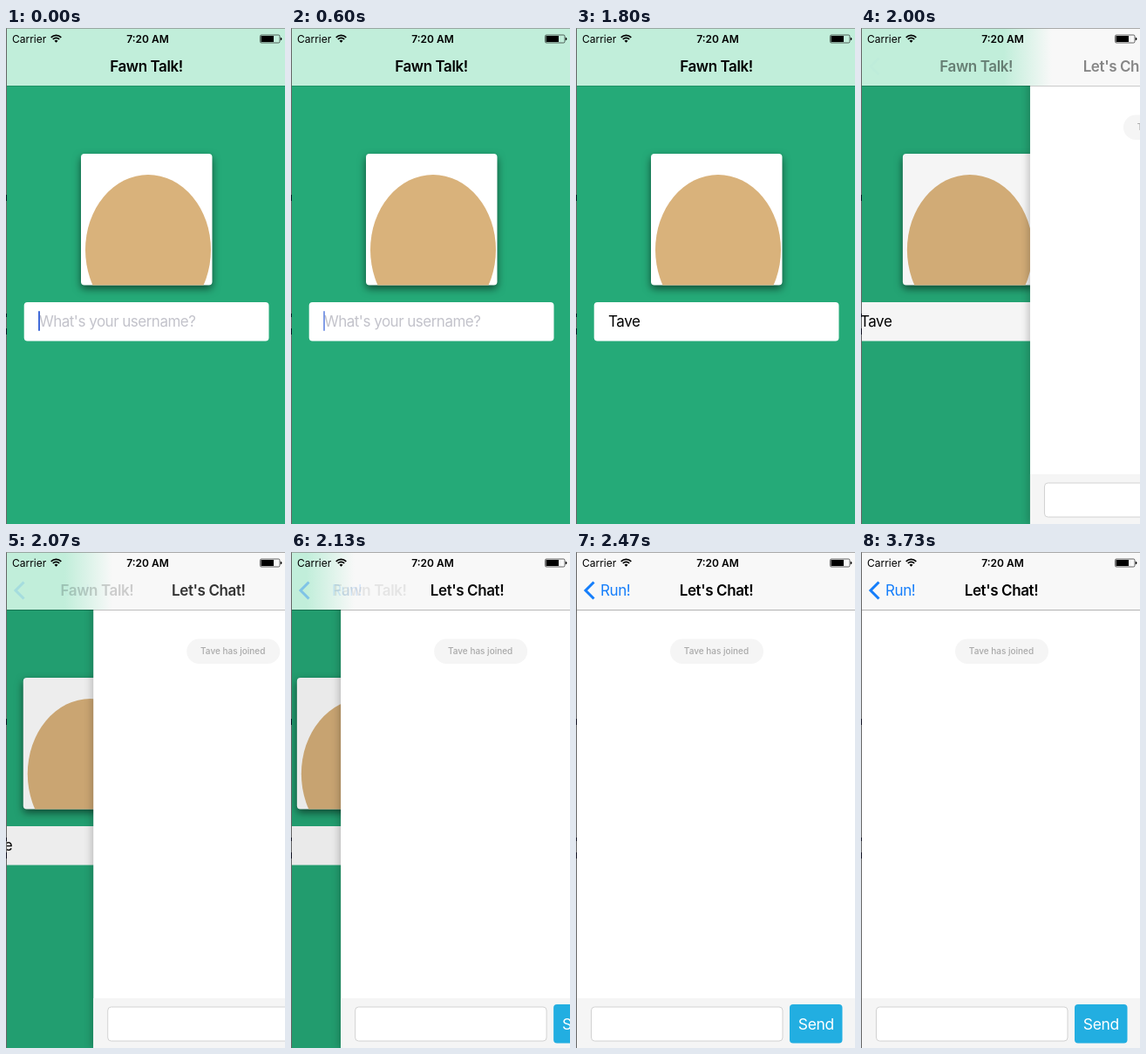
Animation of 320x568 px, one loop 4200 ms. Source, as an HTML page:

```html
<!DOCTYPE html>
<html lang="en">
<head>
<meta charset="utf-8">
<title>Chat sign-in</title>
<style>
  html, body { margin: 0; width: 100%; height: 100%; overflow: hidden; background: #fff; }
  svg { display: block; width: 100%; height: 100%; }
  text { font: 400 17px Inter, "Liberation Sans", sans-serif; letter-spacing: -.4px; }
  .mid { text-anchor: middle; }
  .title { font-weight: 600; }
  .status { font-size: 12px; letter-spacing: 0; }
  .hint { fill: #c3c3cb; letter-spacing: -.51px; }
  .note { font-size: 10px; font-weight: 500; letter-spacing: 0; fill: #a9a9a9; }
  .card { filter: drop-shadow(0 4px 5px rgba(0, 0, 0, .55)); }
  .page { filter: drop-shadow(-2px 0 4px rgba(0, 0, 0, .22)); }
</style>
</head>
<body>
<svg viewBox="0 0 320 568">
  <defs>
    <clipPath id="photo"><rect x="86" y="144" width="150.500" height="150.500" rx="4"/></clipPath>
    <linearGradient id="tint" gradientUnits="userSpaceOnUse" y1="0" y2="0">
      <stop offset="0" stop-color="#c1eeda"/>
      <stop offset="1" stop-color="#f8f8f8"/>
    </linearGradient>
  </defs>

  <rect width="320" height="568" fill="#25aa78"/>
  <g id="login">
    <rect class="card" x="86" y="144" width="150.500" height="150.500" rx="4" fill="#fff"/>
    <ellipse cx="163" cy="254" rx="72" ry="86" fill="#d9b27b" clip-path="url(#photo)"/>
    <rect x="20.700" y="314" width="280.800" height="44.500" rx="4" fill="#fff"/>
    <text id="hint" class="hint" x="38" y="342">What's your username?</text>
    <text id="name" x="37" y="342"></text>
    <rect id="caret" y="324" width="2" height="23" rx="1" fill="#426bd9"/>
  </g>
  <rect id="dim" width="320" height="568"/>

  <g id="chat">
    <rect class="page" x="1" y="0" width="330" height="568" fill="#fff"/>
    <rect x="108" y="99.500" width="107" height="28.500" rx="14.250" fill="#f5f5f5"/>
    <text class="note mid" x="161" y="117">Tave has joined</text>
    <rect x="1" y="511" width="330" height="57" fill="#f5f5f5"/>
    <rect x="17.500" y="521" width="219.500" height="39" rx="4" fill="#fff" stroke="#d2d2d2"/>
    <rect x="245" y="518" width="60.500" height="44.500" rx="4" fill="#22aee1"/>
    <text class="mid" x="275.300" y="546.500" fill="#fff" style="font-size:17.5px">Send</text>
  </g>

  <rect width="320" height="66" fill="url(#tint)"/>
  <rect id="line" y="66" width="320" height="1"/>
  <path id="arrow" d="M20.500 34.500 11 44l9.500 9.500" fill="none" stroke="#157efb" stroke-width="3"/>
  <text id="back" x="28" y="50" fill="#157efb">Run!</text>
  <text id="oldTitle" class="title mid" x="161" y="50">Fawn Talk!</text>
  <text id="newTitle" class="title mid" x="161" y="50">Let's Chat!</text>

  <text class="status" x="7" y="16.500">Carrier</text>
  <g fill="none" stroke="#000" stroke-width="1.700">
    <path d="M51.700 10.800a8.200 8.200 0 0 1 11.600 0M53.800 13a5.200 5.200 0 0 1 7.400 0"/>
    <path d="M57.500 16.800l-2-2.100a2.900 2.900 0 0 1 4 0z" fill="#000" stroke="none"/>
  </g>
  <text class="status mid" x="162.500" y="16.500" style="font-weight:600">7:20 AM</text>
  <rect x="291.500" y="8" width="22.500" height="9" rx="1.500" fill="none" stroke="#000" stroke-width=".6"/>
  <rect x="292.500" y="9" width="14.500" height="7"/>
  <path d="M314.800 10.800q1.600 0 1.600 1.700t-1.600 1.700z"/>

  <rect width="1" height="568" fill="#666"/>
  <path d="M0 191h1v7h-1zM0 327h1v4h-1zM0 344h1v7h-1z" fill="#112"/>
  <rect width="320" height="1" fill="#888" opacity=".7"/>
</svg>
<script>
const LOOP = 4200, TICK = 200 / 3;
const NAME = "Tave";
const KEYS = [670, 870, 1000, 1070];
const PUSH = 2000, SETTLED = 2470;
const BLINK = [[0, 1], [70, .75], [130, .5], [200, .25], [270, 0], [530, .33], [600, .66],
  [670, 1], [1600, .75], [1670, .5], [1730, .25], [1800, 0]];

const el = {};
document.querySelectorAll("[id]").forEach(node => el[node.id] = node);

// The screen refreshes 15 times a second, on times rounded to 10 ms.
const tickTime = n => Math.round(n * TICK / 10) * 10;
function snap(ms) {
  let n = Math.floor(ms / TICK) + 1;
  while (tickTime(n) > ms) n--;
  return tickTime(n);
}

function pushed(t) {
  if (t < PUSH) return 0;
  if (t >= SETTLED) return 1;
  return 1 - .603 * Math.exp(-.0095 * (t - PUSH));
}

function move(node, x) {
  node.setAttribute("transform", `translate(${x.toFixed(2)} 0)`);
}

function draw(ms) {
  const t = snap(ms), p = pushed(t), left = 1 - p;

  const typed = NAME.slice(0, KEYS.filter(k => k <= t).length);
  el.name.textContent = typed;
  el.hint.style.opacity = typed ? 0 : 1;
  el.caret.setAttribute("x", 37 + (typed ? el.name.getComputedTextLength() : 0));
  el.caret.style.opacity = BLINK.filter(b => b[0] <= t).pop()[1];

  move(el.login, -96 * p);
  move(el.chat, p ? 320 * left : 360);
  el.dim.style.opacity = .1 * p;

  const edge = p ? 1 + 320 * left - 30 * p ** 6 : 400;
  el.tint.setAttribute("x1", edge - 30);
  el.tint.setAttribute("x2", edge + 25);
  el.line.style.opacity = .15 + .15 * p;

  move(el.oldTitle, -89 * p ** 1.22);
  move(el.newTitle, 222 * left ** .97);
  move(el.back, 108 * left);
  el.oldTitle.style.opacity = left ** 1.5;
  el.newTitle.style.opacity = Math.min(1, p * 1.15);
  el.arrow.style.opacity = p ** 5;
  el.back.style.opacity = p ** 10;
}

const start = performance.now();
function frame() {
  draw((performance.now() - start) % LOOP);
  requestAnimationFrame(frame);
}
frame();
</script>
</body>
</html>
```
